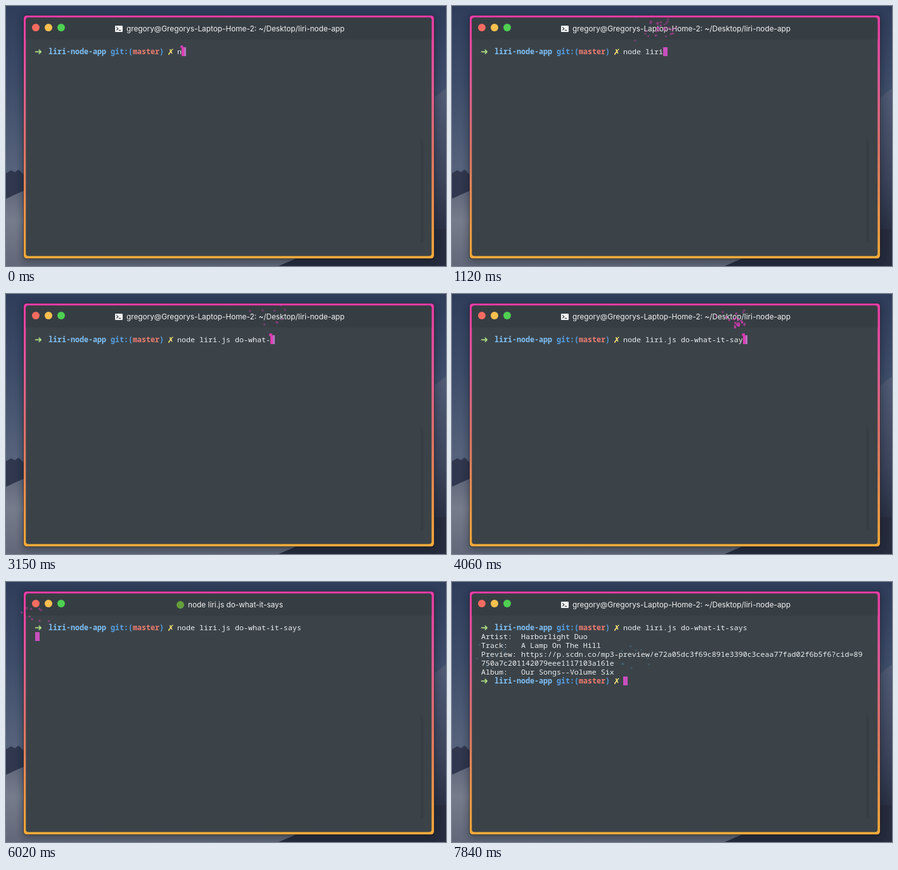
Animation of 694 by 410 pixels, one loop 7.91 s. Source, as an HTML page with a canvas:

```html
<!DOCTYPE html>
<html lang="en">
<head>
<meta charset="utf-8">
<title>Terminal session</title>
<style>
html, body { margin: 0; width: 694px; height: 410px; overflow: hidden; background: #2b3348; }
#stage { position: relative; width: 694px; height: 410px; overflow: hidden; }
#stage > svg, canvas { position: absolute; left: 0; top: 0; }
.line { font: 11.667px "Noto Sans Mono", "DejaVu Sans Mono", monospace; fill: #eceff1; white-space: pre; font-variant-ligatures: none; }
.line .b { font-weight: 700; }
.dir { fill: #7fc1f8; }
.git { fill: #559fe6; }
.branch { fill: #ef7b70; }
.sign { font-family: "DejaVu Sans", sans-serif; font-weight: 700; }
.arrow { fill: #abdc82; font-size: 14.5px; }
.dirty { fill: #ffe678; font-size: 13px; }
.title {
  position: absolute; left: 28px; top: 26px; width: 650px; height: 20px;
  display: flex; align-items: center; justify-content: center; gap: 6px;
  font: 11.8px/20px Inter, Roboto, sans-serif; color: #f1f2f3; white-space: pre;
}
.dot { width: 12px; height: 12px; border-radius: 50%; background: #659f3c; }
</style>
</head>
<body>
<div id="stage">
<svg width="694" height="410" viewBox="0 0 694 410">
  <defs>
    <linearGradient id="sky" x2="0" y2="1">
      <stop offset="0" stop-color="#2f3d5b"/>
      <stop offset=".3" stop-color="#3d4c69"/>
      <stop offset=".62" stop-color="#56627b"/>
      <stop offset="1" stop-color="#4a5064"/>
    </linearGradient>
    <linearGradient id="slope" x2="0" y2="1">
      <stop offset="0" stop-color="#505b75"/>
      <stop offset=".6" stop-color="#3d455d"/>
      <stop offset="1" stop-color="#282e41"/>
    </linearGradient>
    <linearGradient id="dune" x2="0" y2="1">
      <stop offset="0" stop-color="#60667a"/>
      <stop offset=".4" stop-color="#777c8c"/>
      <stop offset="1" stop-color="#626879"/>
    </linearGradient>
    <linearGradient id="edge" x2="0" y2="1">
      <stop offset="0" stop-color="#e93ba5"/>
      <stop offset=".25" stop-color="#e1589a"/>
      <stop offset=".55" stop-color="#dc7468"/>
      <stop offset="1" stop-color="#f0aa38"/>
    </linearGradient>
    <filter id="blur" x="-10%" y="-10%" width="120%" height="120%"><feGaussianBlur stdDeviation="6"/></filter>
  </defs>
  <rect width="694" height="410" fill="url(#sky)"/>
  <path d="M0 264L8 259L14 262L20 258L30 268V310H0Z" fill="#30374e"/>
  <path d="M660 158Q680 140 694 130V365H660Z" fill="url(#slope)"/>
  <path d="M0 352H694V410H0Z" fill="#272c3e"/>
  <path d="M0 304Q16 296 34 289V398H458L430 410H0Z" fill="url(#dune)"/>
  <rect x="26" y="16" width="652" height="388" rx="6" fill="#10131e" opacity=".4" filter="url(#blur)"/>
  <rect x="27" y="14" width="649" height="385" rx="5" fill="#35202c" opacity=".5"/>
  <rect x="28" y="15" width="647" height="383" rx="4.5" fill="url(#edge)"/>
  <rect x="31.3" y="18.3" width="640" height="376" rx="4" fill="#3b4348"/>
  <path d="M31.3 53V22.3Q31.3 18.3 35.3 18.3H667.3Q671.3 18.3 671.3 22.3V53Z" fill="#373e43"/>
  <rect x="653" y="210" width="5" height="163" rx="2.5" fill="#373f44"/>
  <circle cx="47" cy="34" r="6" fill="#fa6b60"/>
  <circle cx="67" cy="34" r="6" fill="#fcc04f"/>
  <circle cx="87" cy="34" r="6" fill="#4fd052"/>
  <rect id="cursor" width="7" height="14" fill="#c94fbd"/>
  <rect id="flash" width="4" height="14" fill="#e23db4"/>
  <g id="prompt" class="line">
    <text class="sign arrow" x="45" y="77">➜</text>
    <text class="b" x="67" y="76"><tspan class="dir">liri-node-app</tspan> <tspan class="git">git:(</tspan><tspan class="branch">master</tspan><tspan class="git">)</tspan></text>
    <text class="sign dirty" x="254.5" y="76.5">✗</text>
  </g>
  <text id="typed" class="line" x="270" y="76"></text>
  <g id="output"></g>
</svg>
<div class="title" id="shell"><svg width="12" height="10" viewBox="0 0 12 10"><rect width="12" height="10" rx="1.2" fill="#f4f5f5"/><path d="M2.2 2.4L4.8 4.8L2.2 7.2M5.8 7.4H9" fill="none" stroke="#373e43" stroke-width="1.2"/></svg><span>gregory@Gregorys-Laptop-Home-2: ~/Desktop/liri-node-app</span></div>
<div class="title" id="job"><i class="dot"></i><span>node liri.js do-what-it-says</span></div>
<canvas id="sparks" width="694" height="410"></canvas>
</div>
<script>
const LOOP = 7910, STEP = 70, ENTER = 5670, DONE = 7210;
const COMMAND = "node liri.js do-what-it-says";
const KEYS = [0, 140, 210, 350, 420, 560, 630, 700, 840, 1190, 1330, 1400, 1540, 1610, 1750,
  2100, 2170, 2310, 2450, 2660, 3150, 3290, 3360, 3640, 3850, 3920, 4060, 4200];
const REPLY = [
  "Artist:  Harborlight Duo",
  "Track:   A Lamp On The Hill",
  "Preview: https://p.scdn.co/mp3-preview/e72a05dc3f69c891e3390c3ceaa77fad02f6b5f6?cid=89",
  "750a7c201142079eee1117103a161e",
  "Album:   Our Songs--Volume Six"
];
const $ = id => document.getElementById(id);
const NS = "http://www.w3.org/2000/svg";
const show = (el, on) => el.style.visibility = on ? "visible" : "hidden";

REPLY.forEach((line, i) => {
  const text = document.createElementNS(NS, "text");
  text.setAttribute("class", "line");
  text.setAttribute("x", 46);
  text.setAttribute("y", 90 + 14 * i);
  text.textContent = line;
  $("output").append(text);
});
const nextPrompt = $("prompt").cloneNode(true);
nextPrompt.removeAttribute("id");
nextPrompt.setAttribute("transform", "translate(0 84)");
$("output").append(nextPrompt);

let seed = 11;
const rand = () => (seed = (seed * 16807) % 2147483647) / 2147483647;

// Each burst throws a handful of sparks upwards from the cursor.
const sparks = [];
function burst(time, x, y, color) {
  const count = 7 + Math.floor(rand() * 5);
  for (let i = 0; i < count; i++) {
    sparks.push({ time, x, y, color, vx: rand() * 2 - 1, vy: -2.8 + rand() * 1.2 });
  }
}
KEYS.forEach((time, i) => burst(time, 277 + 7 * i, 66, "#d03db2"));
burst(ENTER, 46, 80, "#d03db2");
burst(DONE, 50, 149, "#55809f");
burst(DONE, 273, 149, "#55809f");

const ctx = $("sparks").getContext("2d");
function drawSparks(t) {
  ctx.clearRect(0, 0, 694, 410);
  for (const s of sparks) {
    const n = (t - s.time) * 0.06 + 1;
    if (n < 1 || n > 42) continue;
    ctx.globalAlpha = Math.pow(0.97, n);
    ctx.fillStyle = s.color;
    ctx.fillRect(s.x + s.vx * n - 1, s.y + s.vy * n + 0.0375 * n * n - 1, 3, 3);
  }
}

function render(t) {
  const count = KEYS.filter(k => k <= t).length;
  const running = t >= ENTER && t < DONE;
  const done = t >= DONE;
  const fresh = t - KEYS[count - 1] < STEP;
  const x = done ? 270 : running ? 46 : 270 + 7 * count;
  const y = done ? 149 : running ? 79 : 65;
  $("typed").textContent = COMMAND.slice(0, count);
  for (const id of ["cursor", "flash"]) {
    $(id).setAttribute("x", x);
    $(id).setAttribute("y", y);
  }
  $("cursor").setAttribute("fill", fresh ? "#b273bd" : "#c94fbd");
  show($("flash"), fresh);
  show($("output"), done);
  show($("shell"), !running);
  show($("job"), running);
  drawSparks(t);
}

const start = performance.now();
function tick() {
  const t = (performance.now() - start) % LOOP;
  render(Math.floor(t / STEP) * STEP);
  requestAnimationFrame(tick);
}
tick();
</script>
</body>
</html>
```
